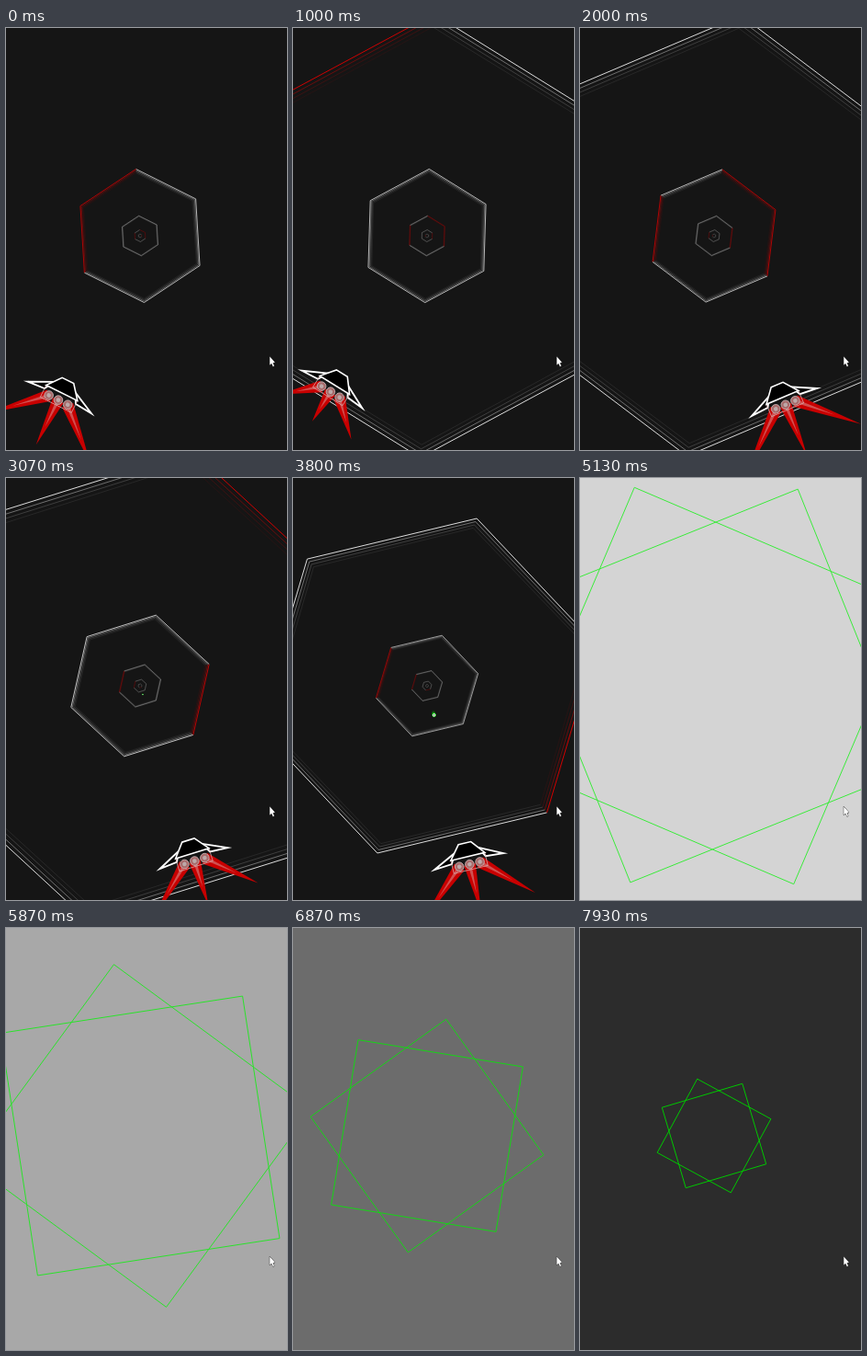
Write an HTML page with a canvas that moves like this. It is 306x459 px and loops after 8 s.

```html
<!DOCTYPE html>
<html lang="en">
<head>
<meta charset="utf-8">
<title>Hex tunnel</title>
<style>
html, body { margin: 0; width: 100%; height: 100%; overflow: hidden; background: #151515; }
canvas { display: block; }
</style>
</head>
<body>
<canvas id="stage" width="306" height="459"></canvas>
<script>
const ctx = document.getElementById('stage').getContext('2d');
const W = 306, H = 459, CX = 146, CY = 226;
const LOOP = 8000, FPS = 15, FLASH = 4.85;
const RAD = Math.PI / 180;

// Red sides of each ring, counted clockwise from the upper right one
const redSides = { 0: [4, 5], 2: [0, 1, 4], 3: [1], 4: [4], 5: [4], 6: [2] };

const lerp = (a, b, k) => a + (b - a) * k;
const clamp = (v, lo, hi) => Math.min(hi, Math.max(lo, v));
const spin = t => -3.5 + 5.28 * t;
const ringRadius = (n, t) => 72.7 * Math.exp(1.2 * (t - n));

function path(points, close = true) {
  ctx.beginPath();
  for (const [x, y] of points) ctx.lineTo(x, y);
  if (close) ctx.closePath();
}

function disc(x, y, r, fill) {
  ctx.beginPath();
  ctx.arc(x, y, r, 0, 2 * Math.PI);
  ctx.fillStyle = fill;
  ctx.fill();
}

function polygon(sides, r, deg) {
  return Array.from({ length: sides }, (_, i) => {
    const a = (deg - 90 + 360 * i / sides) * RAD;
    return [CX + r * Math.cos(a), CY + r * Math.sin(a)];
  });
}

function drawRing(n, t, fade) {
  const r = ringRadius(n, t);
  if (r < 1.5 || r > 460) return;
  const pts = polygon(6, r, spin(t));
  const reds = redSides[n] || [];
  ctx.globalAlpha = fade * Math.min(1, 0.12 + r / 105);
  ctx.lineWidth = 1;
  for (const red of [false, true]) {
    ctx.strokeStyle = red ? '#d00000' : '#dcdcdc';
    ctx.beginPath();
    for (let i = 0; i < 6; i++) {
      if (reds.includes(i) !== red) continue;
      ctx.moveTo(...pts[i]);
      ctx.lineTo(...pts[(i + 1) % 6]);
    }
    ctx.stroke();
  }
  ctx.globalAlpha = 1;
}

function drawTunnel(t) {
  for (let age = 3; age >= 0; age--) {
    for (let n = 0; n < 10; n++) drawRing(n, t - age / 60, 0.45 ** age);
  }
}

function flameLength(t) {
  const keys = [46, 32, 51, 39, 48, 50];
  const i = clamp(Math.floor(t), 0, 4);
  return lerp(keys[i], keys[i + 1], t - i) + 4 * Math.sin(10 * Math.PI * t);
}

function drawFlame(x, dx, dy) {
  const len = Math.hypot(dx, dy);
  const nx = -dy / len, ny = dx / len;
  const wedge = (w, k, fill) => {
    path([[x + nx * w, 200 + ny * w], [x + dx * k, 200 + dy * k], [x - nx * w, 200 - ny * w]]);
    ctx.fillStyle = fill;
    ctx.fill();
  };
  wedge(6.5, 1, '#c80000');
  wedge(2, 0.6, '#d05050');
}

function drawShip(t) {
  const hop = clamp((t - 1.45) / 0.2, 0, 1);
  const lane = lerp(30, -30, hop * hop * (3 - 2 * hop));
  ctx.save();
  ctx.translate(CX, CY);
  ctx.rotate((spin(t) + lane) * RAD);

  const s = flameLength(t);
  drawFlame(-11.5, -1.1 * s, s);
  drawFlame(11.5, 1.1 * s, s);
  drawFlame(0, 0, 1.17 * s);

  ctx.strokeStyle = '#fff';
  ctx.lineWidth = 1.9;
  ctx.fillStyle = '#000';
  for (const side of [-1, 1]) {
    path([[38.5 * side, 196.5], [13 * side, 184], [19 * side, 195]]);
    ctx.fill();
    ctx.stroke();
  }
  path([[-19, 191], [-19, 205.5], [19, 205.5], [19, 191]], false);
  ctx.lineWidth = 0.7;
  ctx.strokeStyle = '#d8b0b0';
  ctx.stroke();
  path([[-7, 176], [7, 176], [19, 191], [-19, 191]]);
  ctx.fill();
  ctx.lineWidth = 1.6;
  ctx.strokeStyle = '#fff';
  ctx.stroke();

  for (const x of [-11.5, 0, 11.5]) {
    disc(x, 199.6, 4.8, '#a86a6a');
    ctx.lineWidth = 0.8;
    ctx.strokeStyle = '#c8b4b4';
    ctx.stroke();
    disc(x, 199.6, 2.3, '#bca8a8');
  }
  ctx.restore();
}

// A green orb comes down the ship's lane and sets off the flash
function drawOrb(t) {
  if (t < 2.5) return;
  const dist = t => 119.5 * Math.exp(1.62 * (t - 4.6));
  ctx.save();
  ctx.translate(CX, CY);
  ctx.rotate((spin(t) - 30) * RAD);
  for (let age = 5; age > 0; age--) {
    const d = dist(t - age / 60);
    ctx.globalAlpha = 0.5 ** age;
    disc(0, d, d / 16, '#00d800');
  }
  ctx.globalAlpha = 1;
  const d = dist(t), k = d / 119.5;
  disc(0, d, 7.8 * k, '#00e400');
  disc(0, d, 6 * k, '#fff');
  disc(0, d, 2.4 * k, '#102010');
  ctx.restore();
}

function drawFlash(t) {
  const level = 168 - 60 * (t - 5.867);
  const g = Math.round(level);
  ctx.fillStyle = `rgb(${g},${g},${g})`;
  ctx.fillRect(0, 0, W, H);
  const tint = Math.round(clamp((level - 45) * 0.35, 0, 60));
  ctx.strokeStyle = `rgb(${tint},${200 + tint * 0.6},${tint})`;
  ctx.lineWidth = 1;
  const turn = 36.3 + 18 * (t - 5.867);
  for (const offset of [0, 45]) {
    path(polygon(4, level + 20.5, turn + offset));
    ctx.stroke();
  }
}

function drawCursor() {
  path([[287.3, 357.5], [287.3, 366.5], [289.2, 364.8], [290.8, 368.2], [292, 367.6], [290.6, 364.3], [292.8, 363.8]]);
  ctx.lineWidth = 1;
  ctx.strokeStyle = '#333';
  ctx.stroke();
  ctx.fillStyle = '#fff';
  ctx.fill();
}

function draw(t) {
  if (t >= FLASH) {
    drawFlash(t);
  } else {
    ctx.fillStyle = '#151515';
    ctx.fillRect(0, 0, W, H);
    drawTunnel(t);
    drawOrb(t);
    drawShip(t);
  }
  drawCursor();
}

const start = performance.now();
function tick() {
  const ms = (performance.now() - start) % LOOP;
  draw(Math.floor(ms * FPS / 1000 + 0.1) / FPS);
  requestAnimationFrame(tick);
}
tick();
</script>
</body>
</html>
```
